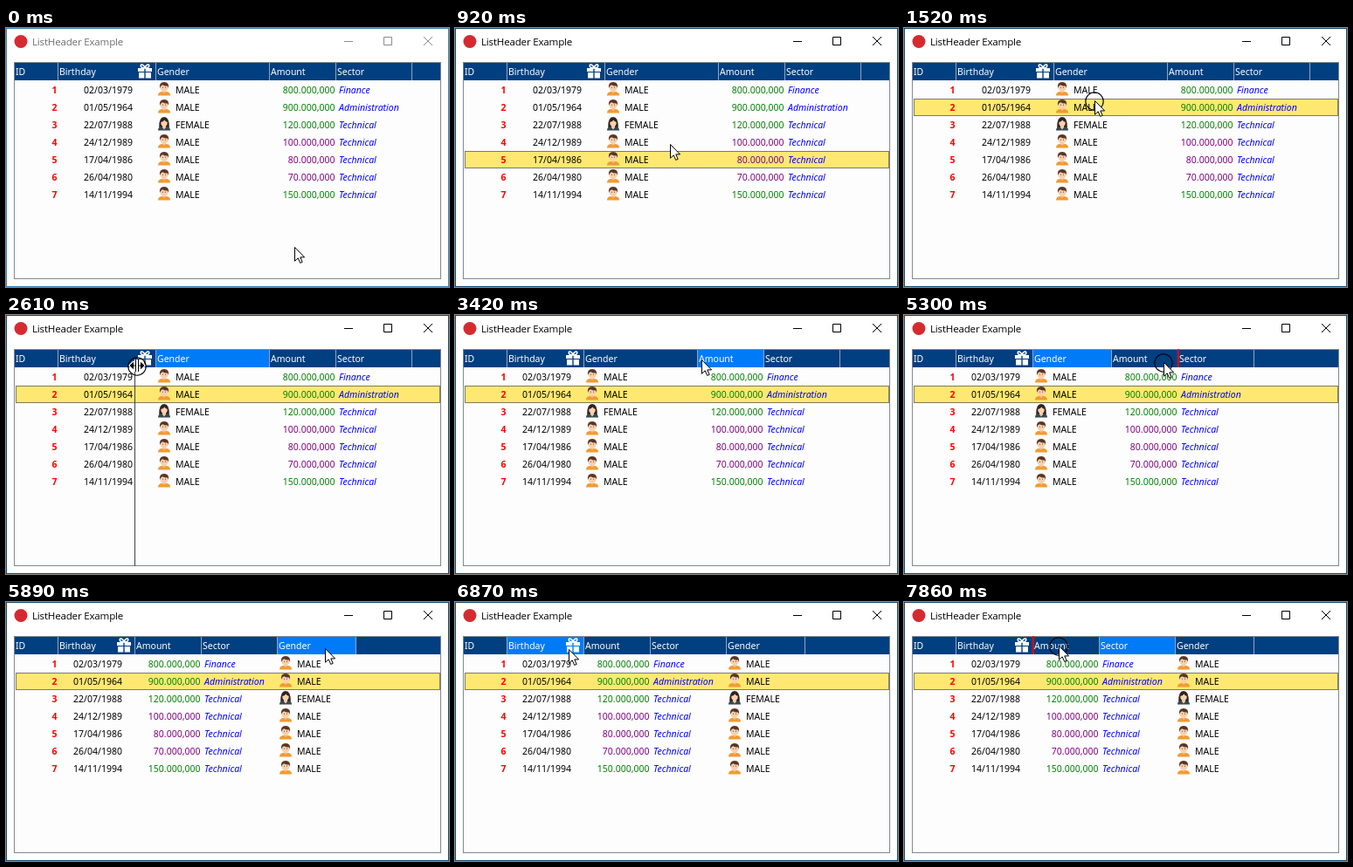
Animation of 507 by 297 pixels, one loop 8 s. Source, as an HTML page:

```html
<!DOCTYPE html>
<html lang="en">
<head>
<meta charset="utf-8">
<title>ListHeader Example</title>
<style>
  html, body { margin: 0; width: 100%; height: 100%; overflow: hidden; background: #fff; }
  svg { display: block; }
  text { font: 10.5px "Noto Sans", "Open Sans", sans-serif; white-space: pre; }
  .title { font: 11.6px "Open Sans", sans-serif; letter-spacing: -.2px; }
  .head { fill: #fff; }
  .id { font-weight: bold; fill: #f00; text-anchor: end; }
  .birthday { text-anchor: middle; }
  .amount { text-anchor: end; }
  .sector { font-style: italic; fill: #00f; }
</style>
</head>
<body>
<svg id="stage" width="507" height="297" viewBox="0 0 507 297">
  <defs>
    <g id="gift" fill="#fff">
      <path d="M0 5H7.3V9H0ZM8.7 5H16V9H8.7ZM1 10H7.3V16.5H1ZM8.7 10H15V16.5H8.7Z"/>
      <path d="M8 5C5 5 2.8 4 3.2 2S7 1 8 5C9 1 12.4 0 12.8 2S11 5 8 5Z" fill="none" stroke="#fff" stroke-width="1.5"/>
    </g>
    <g id="male">
      <path d="M0 15.5Q0 11 5 11H9Q14 11 14 15.5Z" fill="#f39a2e"/>
      <path d="M5 9H9V11.5L7 13L5 11.5Z" fill="#eeb98f"/>
      <ellipse cx="7" cy="6.3" rx="4.4" ry="5" fill="#fbd0ac"/>
      <path d="M2 7Q1 0 7 0T12 7L11 4.5Q7 5 5.5 3.2Q3.5 4 3 5Z" fill="#5b3524"/>
      <path d="M5 6.2H6M8 6.2H9" stroke="#553"/>
    </g>
    <g id="female">
      <path d="M1.2 12Q1 0 7 0T12.8 12Z" fill="#30231f"/>
      <path d="M0 15.5Q0 11 5 11H9Q14 11 14 15.5Z" fill="#35494f"/>
      <path d="M5 9H9V12L7 14.5L5 12Z" fill="#f5cba9"/>
      <ellipse cx="7" cy="6.6" rx="3.7" ry="4.3" fill="#fbd0ac"/>
      <path d="M3 6Q3 1.5 7 1.5T11 6Q8 5 7.5 3.5Q6 5.5 3 6Z" fill="#30231f"/>
    </g>
  </defs>
  <rect id="frame" x=".5" y=".5" width="506" height="296" fill="#fff"/>
  <circle cx="17" cy="15.5" r="7.5" fill="#d52b30"/>
  <text id="title" class="title" x="30" y="20">ListHeader Example</text>
  <path id="buttons" fill="none" d="M387 15.5H397M432.5 10.5H441.5V19.5H432.5ZM478 10L488 20M488 10L478 20"/>
  <rect x="9.5" y="39.5" width="488" height="248" fill="#fdfdfd" stroke="#828790"/>
  <rect x="10" y="40" width="487" height="20" fill="#003f80"/>
  <rect id="selection" x="11.5" width="485" height="19" fill="#ffe871" stroke="#000" stroke-dasharray="1 1"/>
  <g id="columns"></g>
  <rect id="splitLine" y="60" width="1" height="228" fill="#404040"/>
  <rect id="dropLine" y="39" width="2" height="21" fill="#f00"/>
  <g id="cursor">
    <circle id="ring" cy="1" r="10.2" fill="none" stroke="#000" stroke-width="1.1"/>
    <path id="arrow" d="M.5 .5V16.3L4.2 12.8L6.7 18.4L9.2 17.4L6.8 11.9H11.6Z" fill="#fff" stroke="#000"/>
    <g id="splitter" stroke-linejoin="round">
      <path d="M-1.5 -7V7M1.5 -7V7M-8 0L-4 -4V4ZM8 0L4 -4V4ZM-5 0H-2M5 0H2" fill="#fff" stroke="#fff" stroke-width="3"/>
      <path d="M-1.5 -7V7M1.5 -7V7M-8 0L-4.5 -3.5V3.5ZM8 0L4.5 -3.5V3.5ZM-5 0H-2M5 0H2" stroke="#000"/>
    </g>
  </g>
</svg>
<script>
const LOOP = 8000;
const HEADER = { top: 40, bottom: 60, left: 9 };
const ROW = { top: 61, height: 20 };
const $ = id => document.getElementById(id);
const show = (el, on) => el.setAttribute("visibility", on ? "visible" : "hidden");

const records = [
  ["02/03/1979", "MALE", "800.000,000", "Finance"],
  ["01/05/1964", "MALE", "900.000,000", "Administration"],
  ["22/07/1988", "FEMALE", "120.000,000", "Technical"],
  ["24/12/1989", "MALE", "100.000,000", "Technical"],
  ["17/04/1986", "MALE", "80.000,000", "Technical"],
  ["26/04/1980", "MALE", "70.000,000", "Technical"],
  ["14/11/1994", "MALE", "150.000,000", "Technical"]
].map(([birthday, gender, amount, sector], i) => ({ id: i + 1, birthday, gender, amount, sector }));

// Each column anchors its cells at a share of its width plus an inset.
const columns = {
  id: { label: "ID", share: 1, inset: -.5 },
  birthday: { label: "Birthday", share: .5, inset: 2 },
  gender: { label: "Gender", share: 0, inset: 23 },
  amount: { label: "Amount", share: 1, inset: -.5 },
  sector: { label: "Sector", share: 0, inset: 4 }
};

// Pointer moves: first step, last step, step count, destination.
const moves = [
  [60, 420, 5, 257, 152], [920, 1020, 2, 235, 114],
  [1220, 1420, 3, 218, 83], [1720, 2020, 4, 190, 60],
  [2120, 2300, 3, 174, 57], [2440, 2610, 3, 150, 58],
  [2910, 3420, 7, 282, 51], [3890, 3890, 1, 281, 51],
  [4090, 4090, 1, 279, 52], [4254, 4500, 4, 239, 53],
  [4740, 4740, 1, 232, 53], [4894, 5510, 9, 329, 54],
  [5590, 5690, 2, 365, 53], [5990, 6160, 3, 394, 54],
  [6390, 6800, 6, 130, 54], [6880, 7190, 4, 226, 51],
  [7250, 7250, 1, 236, 50], [7350, 7350, 1, 241, 50],
  [7530, 7860, 5, 177, 50]
];

const presses = [
  { from: 620, to: 720 },
  { from: 1520, to: 1620 },
  { from: 2380, to: 2710, resize: "birthday", hot: "gender" },
  { from: 4172, to: 4580, resize: "gender", hot: "amount" },
  { from: 4817, to: 5890, drag: "gender", hot: "gender" },
  { from: 7350, to: LOOP, drag: "sector", hot: "sector" }
];

function pointerAt(t) {
  let x = 330, y = 251;
  for (const [start, end, steps, toX, toY] of moves) {
    if (t < start) break;
    const gap = (end - start) / (steps - 1) || 1;
    const part = Math.min(steps, Math.floor((t - start) / gap + 1e-6) + 1) / steps;
    x += (toX - x) * part;
    y += (toY - y) * part;
  }
  return { x: Math.round(x), y: Math.round(y) };
}

function layoutAt(t) {
  const widths = { id: 50, birthday: t < 2710 ? 112 : 88, gender: t < 4580 ? 130 : 90, amount: 76, sector: 87 };
  const order = t < 5890
    ? ["id", "birthday", "gender", "amount", "sector"]
    : ["id", "birthday", "amount", "sector", "gender"];
  let x = HEADER.left;
  return order.map(key => {
    const column = { key, x, width: widths[key], right: x + widths[key] };
    x = column.right;
    return column;
  });
}

function cellMarkup(key, record, i) {
  const y = ROW.top + i * ROW.height;
  const icon = key === "gender" ? `<use href="#${record.gender.toLowerCase()}" x="-20" y="${y + 1}"/>` : "";
  const low = parseInt(record.amount) <= 100;
  const fill = key === "amount" ? `fill="${low ? "#800080" : "#008000"}"` : "";
  return `${icon}<text class="${key}" y="${y + 14}" ${fill}>${record[key]}</text>`;
}

$("columns").innerHTML = Object.entries(columns).map(([key, { label }]) => `
  <g id="${key}">
    <rect class="hot" x="1" y="40" height="20" fill="#007bf7"/>
    <rect class="divider" y="40" width="1" height="20" fill="#8ba6c3"/>
    <text class="head" x="2" y="54">${label}</text>
    ${key === "birthday" ? '<use class="gift" href="#gift" y="41"/>' : ""}
    <g class="cells">${records.map((record, i) => cellMarkup(key, record, i)).join("")}</g>
  </g>`).join("");

for (const [key, column] of Object.entries(columns)) {
  const group = $(key);
  for (const part of ["hot", "divider", "gift", "cells"]) column[part] = group.querySelector("." + part);
  column.group = group;
}

function drawColumn({ key, x, width }, isHot) {
  const { group, hot, divider, gift, cells, share, inset } = columns[key];
  group.setAttribute("transform", `translate(${x})`);
  hot.setAttribute("width", width - 1);
  show(hot, isHot);
  divider.setAttribute("x", width);
  if (gift) gift.setAttribute("x", width - 20);
  cells.setAttribute("transform", `translate(${width * share + inset})`);
}

function dropPosition(layout, dragged, x) {
  const source = layout.find(c => c.key === dragged);
  const over = layout.find(c => x > c.x && x <= c.right);
  if (!over || over === source) return null;
  return over.x > source.x ? over.right : over.x;
}

function drawWindow(t) {
  const active = t >= 620;
  $("frame").setAttribute("stroke", active ? "#174a70" : "#3b82b5");
  $("title").setAttribute("fill", active ? "#000" : "#707070");
  $("buttons").setAttribute("stroke", active ? "#000" : "#8c8c8c");
  const selected = t < 1520 ? 4 : 1;
  $("selection").setAttribute("y", ROW.top + selected * ROW.height + .5);
  show($("selection"), active);
}

function render(t) {
  const layout = layoutAt(t);
  const pointer = pointerAt(t);
  const press = presses.find(p => t >= p.from && t < p.to);
  const inHeader = pointer.y >= HEADER.top && pointer.y < HEADER.bottom;
  const hover = inHeader && layout.find(c => pointer.x > c.x && pointer.x <= c.right);
  const hotKey = press?.hot || hover?.key;
  drawWindow(t);
  layout.forEach(column => drawColumn(column, column.key === hotKey));

  const resizing = press?.resize && layout.find(c => c.key === press.resize);
  show($("splitLine"), resizing);
  if (resizing) {
    const offset = pointer.x - pointerAt(press.from).x;
    $("splitLine").setAttribute("x", resizing.right + offset);
  }

  const drop = press?.drag ? dropPosition(layout, press.drag, pointer.x) : null;
  show($("dropLine"), drop !== null);
  if (drop !== null) $("dropLine").setAttribute("x", drop);

  const nearDivider = inHeader && layout.some(c => Math.abs(pointer.x - c.right) < 4);
  const splitting = resizing || (nearDivider && !press?.drag);
  $("cursor").setAttribute("transform", `translate(${pointer.x} ${pointer.y})`);
  show($("ring"), press);
  show($("arrow"), !splitting);
  show($("splitter"), splitting);
}

const begin = performance.now();
function tick() {
  render((performance.now() - begin) % LOOP);
  requestAnimationFrame(tick);
}
tick();
</script>
</body>
</html>
```
